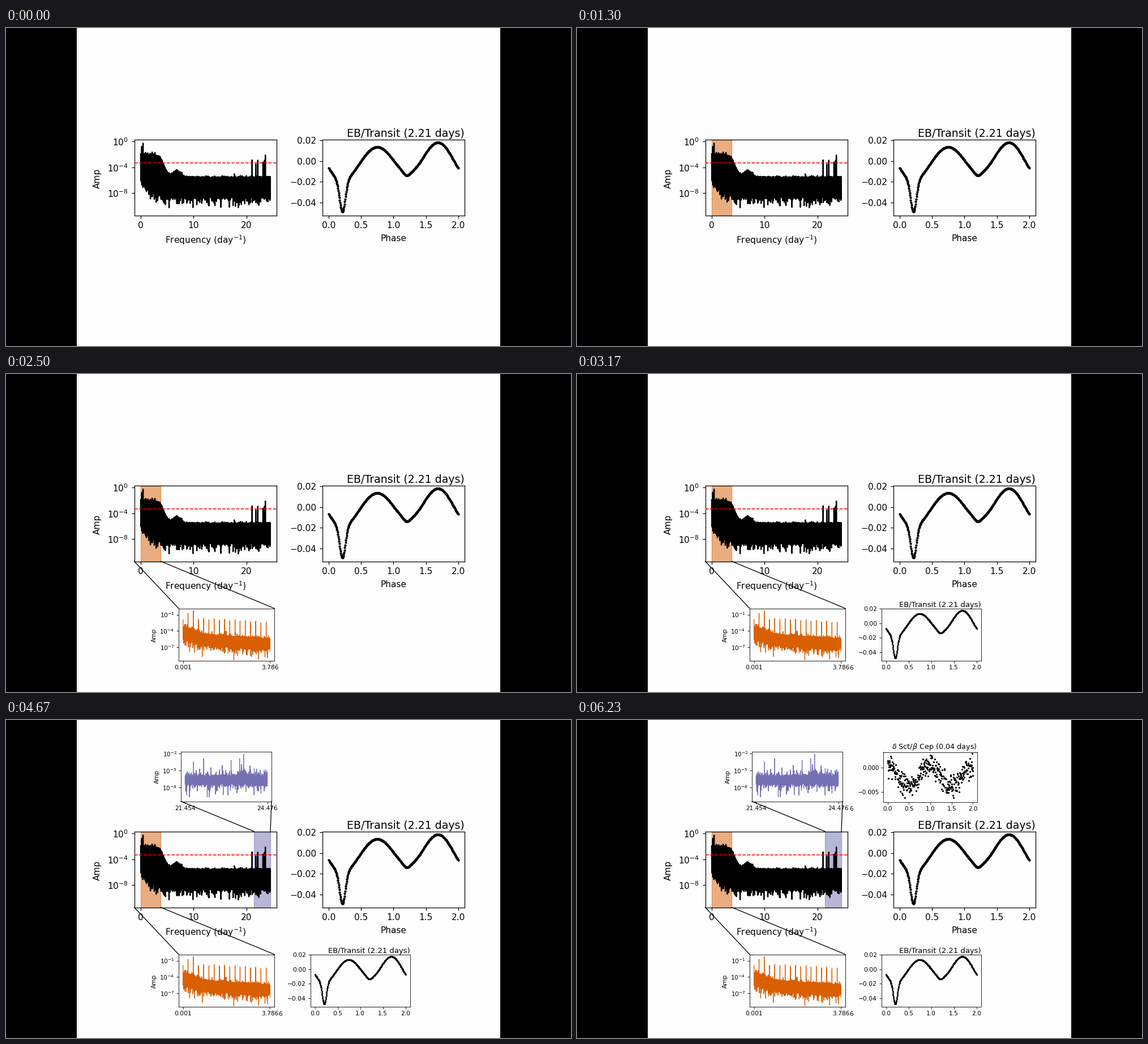
Animation, 998 px wide and 561 px high, one loop 6310 ms. Source, as a matplotlib script:

```python
import numpy as np
import matplotlib.pyplot as plt
from matplotlib.animation import FuncAnimation

W, H, LOOP, FRAMES = 998, 561, 6310, 63
STEP = LOOP / FRAMES
ORANGE, PURPLE = "#d95f02", "#7570b3"
MAIN, LOW, HIGH = 1.108, 0.768, 0.745  # text and line scale of each row

rng = np.random.default_rng(7)
fig = plt.figure(figsize=(W / 100, H / 100), dpi=100, facecolor="black")


def px_axes(x0, y0, x1, y1, **kw):
    box = (x0 / W, 1 - y1 / H, (x1 - x0) / W, (y1 - y0) / H)
    return fig.add_axes(box, **kw)


def num(v, digits):
    return f"{v:.{digits}f}".replace("-", "\u2212")


def bell(x, center, width):
    return np.exp(-((x - center) / width) ** 2 / 2)


def panel(box, k, xlim, ylim, xticks, xdigits, yticks, ylabels):
    ax = px_axes(*box, facecolor="none", xlim=xlim, ylim=ylim)
    ax.set_xticks(xticks, [num(v, xdigits) for v in xticks])
    ax.set_yticks(yticks, ylabels)
    ax.tick_params(length=3.5 * k, width=0.8 * k, pad=3.5 * k, labelsize=10 * k)
    for spine in ax.spines.values():
        spine.set_linewidth(0.8 * k)
    return ax


def spectrum(box, k, span, ylim, xticks, xdigits, powers, n, top, bottom,
             rough, depth, color, lw):
    """Noisy log amplitude: a zigzag between two envelopes, plus the peaks."""
    pad = 0.05 * (span[1] - span[0])
    ax = panel(box, k, (span[0] - pad, span[1] + pad), ylim, xticks, xdigits,
               powers, [f"$10^{{{p}}}$" for p in powers])
    f = np.linspace(*span, n)
    y = top(f) + rough * rng.exponential(size=n)
    dips = np.minimum(depth * rng.exponential(size=n), 2.5)
    y[1::2] = (bottom(f) - dips)[1::2]
    for freq, height in peaks:
        if span[0] - 0.01 < freq < span[1]:
            i = np.abs(f - freq).argmin() // 2 * 2
            y[i] = max(y[i], height)
    ax.plot(f, y, color=color, lw=lw * k)
    return ax


def phase_plot(box, k, ylim, y, yticks, digits, title, size):
    ax = panel(box, k, (-0.1, 2.1), ylim, np.arange(0, 2.1, 0.5), 1,
               yticks, [num(v, digits) for v in yticks])
    ax.plot(phase, y, "o", color="black", ms=size, mew=0)
    ax.set_title(title, loc="right", fontsize=12.3 * k, pad=2.8 * k)
    return ax


page = px_axes(125, 0, 873, H, facecolor="#fdfdfd", xticks=[], yticks=[])
page.spines[:].set_visible(False)

# a fading comb of harmonics, then a few fast pulsations
peaks = [(0, -1.9), (0.226, -0.75), (0.452, -0.25)]
peaks += [(0.2263 * n, -1.75 - 0.7 * (n / 16) ** 2 + 0.1 * (-1) ** n)
          for n in range(3, 17)]
peaks += [(21.1, -2.85), (21.77, -3.5), (22.14, -2.9), (23.15, -3.2),
          (23.46, -2.9), (23.6, -2.1)]

# full spectrum: plateau with a soft edge, a bump, then a flat floor
main = spectrum(
    (226.5, 196.5, 478, 330.5), MAIN, (0, 24.48), (-11.43, 0.35),
    [0, 10, 20], 0, [-8, -4, 0], 1000,
    lambda f: -5.6 + 3.5 / (1 + np.exp((f - 4.45) / 0.45)) + bell(f, 6.8, 0.7),
    lambda f: -8.4 + 2.6 * np.exp(-f / 2),
    0.09, 0.4, "black", 1.5)
main.axhline(-3.34, color="red", ls="--", lw=MAIN, zorder=3)
band_low = main.axvspan(0.001, 3.786, color=ORANGE, alpha=0.5)
band_high = main.axvspan(21.454, 24.476, color=PURPLE, alpha=0.5)

zoom_low = spectrum(
    (305, 413.5, 474, 506), LOW, (0.001, 3.786), (-9.5, 0.15),
    [0.001, 3.786], 3, [-7, -4, -1], 800,
    lambda f: -4.5 - 0.27 * f + 1.2 * bell(f, 0, 0.42),
    lambda f: -7.3 + 2 * np.exp(-f / 1.4),
    0.15, 0.38, ORANGE, 1.2)

zoom_high = spectrum(
    (309, 56, 469, 143.5), HIGH, (21.454, 24.476), (-10.45, -1.7),
    [21.454, 24.476], 3, [-8, -5, -2], 620,
    lambda f: -6.1 + 0.9 * bell(f, 23.58, 0.09),
    lambda f: -7.2 + 0 * f,
    0.3, 0.48, PURPLE, 1.2)

# folded light curves: slow waves with a deep and a shallow eclipse
phase = np.linspace(0, 2, 360)
turn = np.pi * phase
flux = (0.3 - 14.3 * np.cos(2 * (turn - 0.2 * np.pi))
        - 4.5 * np.cos(turn - 0.3 * np.pi)
        + 1.3 * np.cos(2 * (turn - 0.87 * np.pi)) - 1.1 * np.cos(3 * turn)
        - 30 * bell(phase, 0.208, 0.044) - 3 * bell(phase, 1.2, 0.05)) / 1000
eclipse = dict(ylim=(-0.0521, 0.0207), y=flux, digits=2,
               yticks=[-0.04, -0.02, 0, 0.02], title="EB/Transit (2.21 days)")
phase_plot((559, 196.5, 810, 330.5), MAIN, size=3.1, **eclipse)
fold_low = phase_plot((537.5, 413.5, 713.5, 506), LOW, size=2.2, **eclipse)

pulse = -0.0017 + 0.0022 * np.cos(2 * turn)
pulse += np.clip(rng.normal(0, 0.0012, phase.size), -0.0027, 0.0025)
fold_high = phase_plot(
    (541, 56.5, 707, 144.5), HIGH, (-0.00714, 0.00333), pulse,
    [-0.005, 0], 3, r"$\delta$ Sct/$\beta$ Cep (0.04 days)", 2.3)

# labels and connectors in pixel coordinates
stage = px_axes(0, 0, W, H, xlim=(0, W), ylim=(H, 0), zorder=5)
stage.axis("off")


def label(x, y, text, k, **kw):
    kw = {"ha": "center", "va": "baseline", **kw}
    return stage.text(x, y, text, fontsize=10 * k, **kw)


def amp(x, y, k):
    return label(x, y, "Amp", k, rotation=90, va="center")


def link(x0, y0, x1, y1):
    return stage.plot([x0, x1], [y0, y1], color="black", lw=0.95)[0]


amp(161.5, 265, MAIN)
label(352.2, 379.5, "Frequency (day$^{-1}$)", MAIN)
label(684, 376.3, "Phase", MAIN)

# time in ms at which each group appears
reveals = [
    (1000, [band_low]),
    (1500, [zoom_low, amp(262, 460.5, LOW), link(226.5, 330.5, 305, 413.5),
            link(273.5, 330.5, 474, 413.5)]),
    (2500, [fold_low, label(484.8, 521.8, "6", LOW)]),
    (3600, [band_high]),
    (4300, [zoom_high, amp(266.5, 100, HIGH), link(309, 143.5, 438, 196.5),
            link(469, 143.5, 467, 196.5)]),
    (4800, [fold_high, label(484.8, 160.2, "6", HIGH)]),
]


def update(i):
    for start, group in reveals:
        for artist in group:
            artist.set_visible(i * STEP >= start)
    return []


anim = FuncAnimation(fig, update, frames=FRAMES, interval=STEP, repeat=True,
                     repeat_delay=0, blit=False)
plt.show()
```
